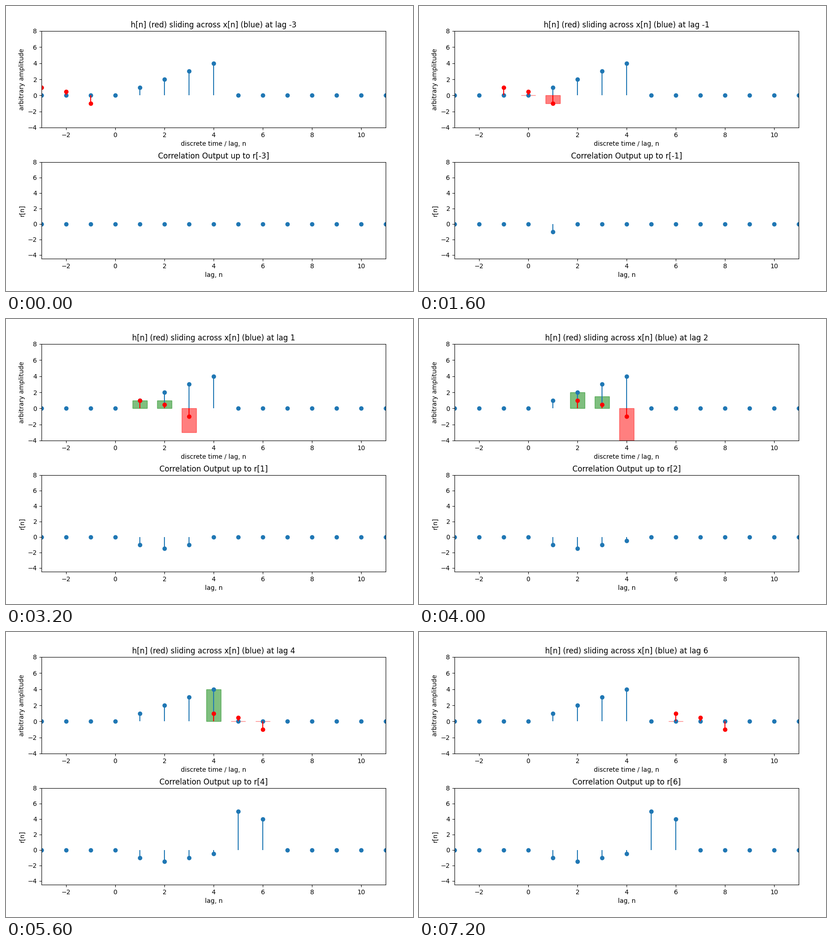
A matplotlib script for the animation above (8 s loop, 894 by 626 pixels).

```python
import matplotlib.pyplot as plt
from matplotlib.animation import FuncAnimation
from matplotlib.patches import Rectangle
import numpy as np

W, H, DPI = 894, 626, 100
LAGS = range(-3, 7)
STEP_MS = 800
BAR_W = 0.6

n = np.arange(-3, 12)
x = np.where((n >= 1) & (n <= 4), n, 0)
h = np.array([1, 0.5, -1])
r = np.array([np.dot(h, x[i - 2:i + 1]) if i >= 2 else 0 for i in range(len(n))])

fig = plt.figure(figsize=(W / DPI, H / DPI), dpi=DPI, facecolor="white")


def make_axes(top, bottom, y_low, xlabel, ylabel):
    ax = fig.add_axes([78 / W, 1 - bottom / H, 756 / W, (bottom - top) / H])
    ax.set(xlim=(-3, 11), ylim=(y_low, 8), xlabel=xlabel, ylabel=ylabel,
           xticks=range(-2, 11, 2), yticks=range(-4, 9, 2))
    return ax


def draw_stem(ax, pos, values, color):
    return ax.stem(pos, values, linefmt=color + "-", markerfmt=color + "o",
                   basefmt=" ")


def move_stem(stem, pos, values):
    stem.markerline.set_data(pos, values)
    stem.stemlines.set_segments([[(p, 0), (p, v)] for p, v in zip(pos, values)])


ax_in = make_axes(55, 267, -4, "discrete time / lag, n", "arbitrary amplitude")
ax_out = make_axes(343, 555, -4.5, "lag, n", "r[n]")

draw_stem(ax_in, n, x, "C0")
kernel = draw_stem(ax_in, np.arange(3) - 3, h, "r")
output = draw_stem(ax_out, n, np.zeros(len(n)), "C0")
bars = [ax_in.add_patch(Rectangle((0, 0), BAR_W, 0, alpha=0.5)) for _ in h]


def update(frame):
    lag = LAGS[frame]
    pos = lag + np.arange(3)
    move_stem(kernel, pos, h)
    move_stem(output, n, np.where(n <= lag + 2, r, 0))

    # Products are shown only inside the signal's support, 0 to 6
    for bar, p, weight in zip(bars, pos, h):
        product = weight * x[p + 3]
        bar.set_xy((p - BAR_W / 2, 0))
        bar.set_height(product)
        bar.set_color("green" if product > 0 else "red")
        bar.set_visible(bool(0 <= p <= 6))

    ax_in.set_title(f"h[n] (red) sliding across x[n] (blue) at lag {lag}")
    ax_out.set_title(f"Correlation Output up to r[{lag}]")
    return []


anim = FuncAnimation(fig, update, frames=len(LAGS), interval=STEP_MS,
                     init_func=lambda: update(0), repeat=True, repeat_delay=0)
plt.show()
```
